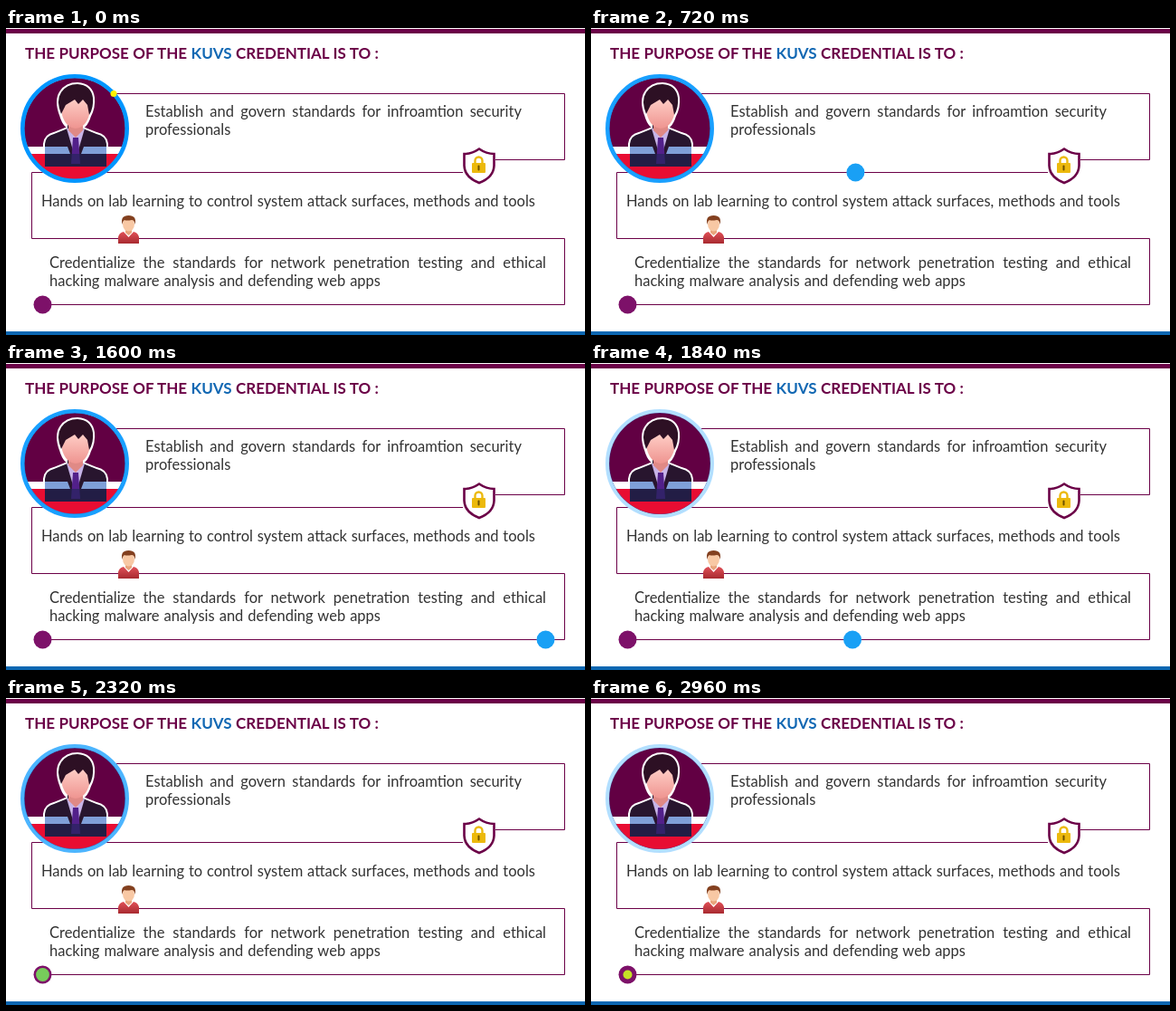
An HTML page that plays this animation: 640x339 px, repeating every 3 s.

```html
<!DOCTYPE html>
<html lang="en">
<head>
<meta charset="utf-8">
<title>Credential purpose</title>
<style>
html, body { margin: 0; width: 640px; height: 339px; overflow: hidden; background: #fff; }
body { position: relative; font: 16.5px/20px Lato, Carlito, system-ui; color: #333; }
svg, h1, p { position: absolute; margin: 0; }
svg { left: 0; top: 0; }
p { text-align: justify; word-spacing: .8px; }
.line { white-space: nowrap; text-align-last: justify; word-spacing: 0; }
h1 { left: 21px; top: 18.4px; width: 391px; font: bold 17px/20px Lato, Carlito, system-ui; color: #6b0047; }
h1 b { color: #1268b3; }
</style>
</head>
<body>
<svg width="640" height="339" viewBox="0 0 640 339">
  <defs>
    <clipPath id="disc"><circle cx="76" cy="111" r="56"/></clipPath>
    <clipPath id="bust"><path d="M43 153V128Q44 119 53 117L68 111V104H85V111L100 117Q110 119 111 128V153Z"/></clipPath>
    <linearGradient id="skin" x2="0" y2="1">
      <stop offset="0" stop-color="#ffd0c8"/><stop offset="1" stop-color="#ee9490"/>
    </linearGradient>
    <linearGradient id="shirt" x2="0" y2="1">
      <stop offset="0" stop-color="#e05058"/><stop offset="1" stop-color="#a82a30"/>
    </linearGradient>
  </defs>

  <rect y="1" width="640" height="5" fill="#6b0047"/>
  <rect y="335" width="640" height="4" fill="#0b67b2"/>
  <path d="M119 72.5H617.5V145.5H541M505 159.5H28.5V232.5H617.5V305.5H40" fill="none" stroke="#6b0047"/>
  <path id="route" d="M119 72.5H617.5V145.5H523V159.5H28.5V232.5H617.5V305.5H40.5" fill="none"/>

  <!-- avatar -->
  <circle cx="76" cy="111" r="60" fill="#fff"/>
  <g clip-path="url(#disc)">
    <rect x="16" y="51" width="120" height="120" fill="#620043"/>
    <rect x="16" y="131" width="120" height="8" fill="#fff"/>
    <rect x="16" y="139" width="120" height="34" fill="#e80d32"/>
    <g fill="#fff" stroke="#fff" stroke-width="4" stroke-linejoin="round">
      <path d="M43 131V128Q44 119 53 117L68 111H85L100 117Q110 119 111 128V131Z"/>
      <path d="M61 96Q55 80 61 71Q67 62 79 62Q94 63 96 77Q97 88 92 97Q88 111 77 112Q65 111 61 96Z"/>
    </g>
    <g clip-path="url(#bust)">
      <rect x="40" y="100" width="75" height="55" fill="#28152e"/>
      <path d="M67 111L77 145L87 111Z" fill="#c8b4e8"/>
      <path d="M69 104H85V113L77 121L69 113Z" fill="#e08a86"/>
      <path d="M74 121H80L82 150H72Z" fill="#52208a"/>
      <path d="M43 131H68L71 139H43ZM86 131H111V139H83Z" fill="#7f9fd8"/>
      <rect x="43" y="139" width="68" height="14" fill="#1e2456" opacity=".6"/>
    </g>
    <path d="M62 85Q64 77 77 77Q90 77 92 85V96Q88 110 77 111Q66 110 62 96Z" fill="url(#skin)"/>
    <path d="M61 95Q55 80 61 71Q67 62 79 62Q94 63 96 77Q97 88 92 96L90 85L85 79L80 84L76 79L66 85Z" fill="#2d1024"/>
  </g>
  <circle id="ring" cx="76" cy="111" r="57.7" fill="none" stroke="#0096ff" stroke-width="4.6"/>

  <circle cx="40.5" cy="305.5" r="10" fill="#7d1169"/>
  <circle id="pulse" cx="40.5" cy="305.5"/>
  <circle id="dot"/>

  <!-- shield -->
  <path d="M523 133.5Q515 139 506.5 139V152Q507 165 523 171Q539 165 539.5 152V139Q531 139 523 133.5Z" fill="#fff" stroke="#6b0047" stroke-width="2.6"/>
  <path d="M518.5 150V146.5a4 4 0 0 1 8 0V150" fill="none" stroke="#ecb90c" stroke-width="2.4"/>
  <rect x="515" y="149" width="15" height="11" rx="1" fill="#ecb90c"/>
  <path d="M522.5 152.5V156.5" stroke="#6d5200" stroke-width="2" stroke-linecap="round"/>

  <!-- small bust -->
  <path d="M124 238V231Q125 226 130 225H141Q146 226 147 231V238Z" fill="url(#shirt)"/>
  <path d="M130 225H141L135.5 231Z" fill="#fff"/>
  <path d="M132 221H139V226L135.5 229L132 226Z" fill="#e8a47c"/>
  <ellipse cx="135.5" cy="216.5" rx="6.5" ry="8" fill="#f8c8a4"/>
  <path d="M128.5 217Q126 207 135.5 207Q145 207 142.5 217Q142 212 139 212Q133 213 131 212Q129 213 128.5 217Z" fill="#83401f"/>
</svg>

<h1 class="line">THE PURPOSE OF THE <b>KUVS</b> CREDENTIAL IS TO :</h1>
<p style="left:154px;top:82px;width:416px">Establish and govern standards for infroamtion security professionals</p>
<p class="line" style="left:39px;top:181px;width:546px">Hands on lab learning to control system attack surfaces, methods and tools</p>
<p style="left:48px;top:249px;width:549px">Credentialize the standards for network penetration testing and ethical hacking malware analysis and defending web apps</p>

<script>
const LOOP = 3000, STEP = 40, ARRIVAL = 2034;
const [route, ring, pulse, dot] = ["route", "ring", "pulse", "dot"].map(id => document.getElementById(id));

// [time, value] keys
const travel = [[0, 0], [538, 680], [1070, 1354], [1150, 1354], [ARRIVAL, 2486.5], [LOOP, 2486.5]];
const glow = [[0, 1], [280, 0], [680, 1], [1080, 0], [1160, 0], [1560, 1], [1960, 0], [2040, 0], [2440, 1], [2840, 0], [LOOP, .4]];

const mix = (a, b, k) => a + (b - a) * k;

function at(keys, t) {
  const i = keys.findIndex(key => key[0] > t);
  const [t0, a] = keys[i - 1], [t1, b] = keys[i];
  return mix(a, b, (t - t0) / (t1 - t0));
}

function set(el, attrs) {
  for (const name in attrs) el.setAttribute(name, attrs[name]);
}

function draw(now) {
  const t = Math.floor(now / STEP) * STEP % LOOP;
  const light = at(glow, t), way = at(travel, t);
  const { x, y } = route.getPointAtLength(way);
  const small = way < 660, arrived = t >= ARRIVAL;

  set(ring, { opacity: light });
  set(dot, { cx: x, cy: y, r: arrived ? 0 : small ? 3.5 : 10, fill: small ? "#fff200" : "#19a0f5" });
  set(pulse, {
    r: arrived ? mix(3.2, 9.2, light) : 0,
    fill: `rgb(${mix(255, 60, light)},${mix(240, 190, light)},${mix(0, 130, light)})`
  });
  requestAnimationFrame(draw);
}
requestAnimationFrame(draw);
</script>
</body>
</html>
```
